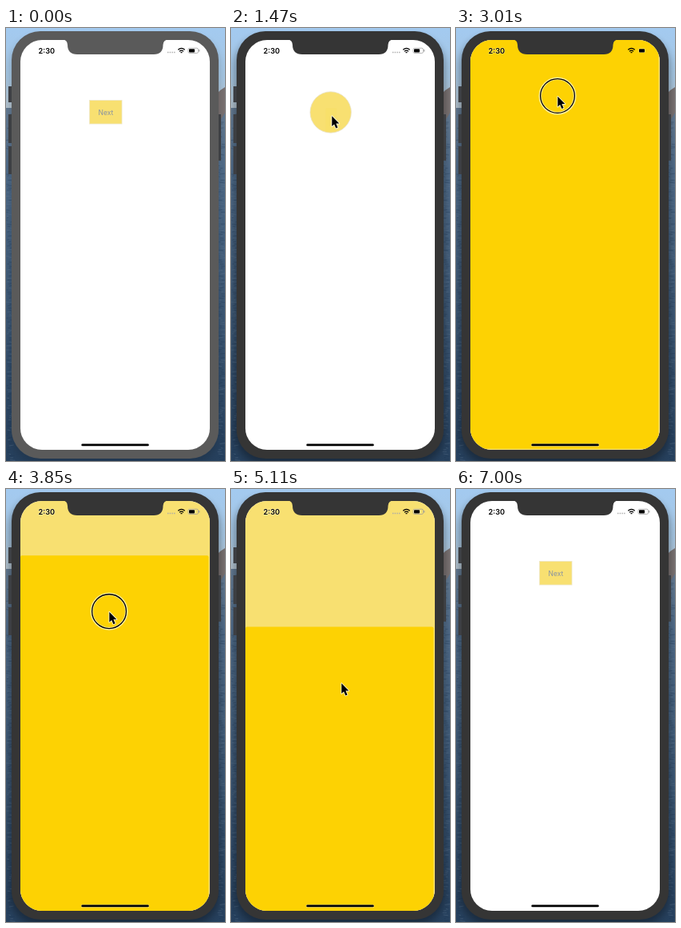
An HTML page for the animation above (7.07 s loop, 274 by 542 pixels).

```html
<!DOCTYPE html>
<html lang="en">
<head>
<meta charset="utf-8">
<title>Circular transition</title>
<style>
  html, body { margin: 0; width: 100%; height: 100%; overflow: hidden; background: #27456a; }
  svg { display: block; width: 274px; height: 542px; }
  text { font-family: Inter, Roboto, sans-serif; }
  .glow { stroke: #fff; stroke-opacity: .45; stroke-width: 1.2; paint-order: stroke; }
</style>
</head>
<body>
<svg viewBox="0 0 274 542">
  <defs>
    <linearGradient id="sky" x2="0" y2="1">
      <stop offset="0" stop-color="#a3caf0"/>
      <stop offset=".6" stop-color="#a5c6e2"/>
      <stop offset="1" stop-color="#b3c2cd"/>
    </linearGradient>
    <linearGradient id="sea" x2="0" y2="1">
      <stop offset="0" stop-color="#647b93"/>
      <stop offset=".2" stop-color="#4d6987"/>
      <stop offset=".6" stop-color="#3c5774"/>
      <stop offset="1" stop-color="#26405d"/>
    </linearGradient>
    <filter id="blur" x="-20%" y="-20%" width="140%" height="140%"><feGaussianBlur stdDeviation="5"/></filter>
    <clipPath id="screen"><rect x="18" y="15" width="237" height="513" rx="27"/></clipPath>
  </defs>

  <rect width="274" height="101" fill="url(#sky)"/>
  <rect y="100" width="274" height="442" fill="url(#sea)"/>
  <path d="M262 84L268 78L274 74V106L262 126Z" fill="#7a7272"/>
  <g id="waves" stroke-width=".8"></g>
  <rect id="shadow" x="4" y="10" width="264" height="536" rx="38" filter="url(#blur)"/>

  <path d="M3 73h5v20h-5zM3 108h5v36h-5zM3 148h5v35h-5zM264 108h5v58h-5z" fill="#3d3f43"/>
  <rect id="bezel" x="7" y="4" width="259" height="535" rx="36"/>

  <g clip-path="url(#screen)">
    <rect x="18" y="15" width="237" height="513" fill="#fff"/>
    <rect x="104.5" y="90.5" width="40.5" height="29.5" fill="#f8e071" stroke="#eee6c4" stroke-width=".8"/>
    <text x="125" y="108.8" font-size="8.5" text-anchor="middle" fill="#8793a2">Next</text>
    <circle id="bubble" cx="124.7" cy="105.5" fill="#f8e071" stroke="#e9e3cb" stroke-width=".8"/>
    <rect id="sheet" x="-118.5" y="-256.5" width="235.5" height="511.8" rx="2" fill="#fdd203"/>
  </g>
  <path id="notch" d="M70 14Q77 15 77 21Q77 33 89 33H185Q196.500 33 196.500 21Q196.500 15 204 14Z"/>

  <text class="glow" x="40.500" y="32" font-size="9.200" font-weight="600">2:30</text>
  <g id="faint" fill="none">
    <path d="M202 30.500h10" stroke="#aaa" stroke-width="1.400" stroke-dasharray="1.400 1.300"/>
    <rect x="228" y="25.200" width="12.500" height="6.300" rx="1.800" stroke="#999" stroke-width=".7"/>
    <path d="M241.800 27v2.600" stroke="#999"/>
  </g>
  <rect class="glow" x="229" y="26.200" width="7" height="4.300" rx=".8"/>
  <g fill="none" stroke="#000" stroke-width="1.300">
    <path d="M215.300 27.300Q219.500 23.500 223.700 27.300M217 29.200Q219.500 27 222 29.200"/>
    <path d="M218.500 30.600h2"/>
  </g>
  <rect class="glow" x="94.300" y="520.500" width="84.500" height="2.800" rx="1.400"/>

  <g id="pointer">
    <g id="touch" fill="none">
      <circle r="21.700" stroke="#fff" stroke-opacity=".6" stroke-width="3.600"/>
      <circle r="21.400" stroke="#000" stroke-width="1.300"/>
    </g>
    <path transform="translate(.3 .8) scale(.88)" d="M0 0V14.500L3.200 11.500L5.700 17.300L8.300 16.200L5.800 10.500H10.300Z" stroke="#fff" stroke-opacity=".8" stroke-width="2" paint-order="stroke" stroke-linejoin="round"/>
  </g>
</svg>
<script>
const LOOP = 7070;
const $ = id => document.getElementById(id);
const mix = (a, b, k) => a + (b - a) * k;
const clamp = k => Math.min(1, Math.max(0, k));
const ease = {
  in: k => k * k,
  out: k => k * (2 - k),
  both: k => k < .5 ? 2 * k * k : 1 - 2 * (1 - k) ** 2
};

// Pointer stops: time, x, y, easing on the way there
const stops = [
  [70, 152, 546, 'both'],
  [910, 126, 109.5, 'both'],
  [2100, 126, 109.5, 'both'],
  [2650, 127, 85, 'both'],
  [3000, 127, 85, 'both'],
  [3850, 129, 153, 'in'],
  [4900, 138, 242.5, 'out'],
  [6440, 138, 242.5, 'both'],
  [6980, 157, 546, 'both']
];

function pointerAt(t) {
  const last = stops[stops.length - 1];
  if (t <= stops[0][0]) return stops[0].slice(1, 3);
  if (t >= last[0]) return last.slice(1, 3);
  const i = stops.findIndex(s => s[0] >= t);
  const [t0, x0, y0] = stops[i - 1], [t1, x1, y1, kind] = stops[i];
  const k = ease[kind]((t - t0) / (t1 - t0));
  return [mix(x0, x1, k), mix(y0, y1, k)];
}

function drawWaves() {
  let seed = 7;
  const random = () => (seed = seed * 16807 % 2147483647) / 2147483647;
  const path = { '#1b3350': '', '#6f869e': '' };
  for (let y = 108; y < 542; y += 2.5) {
    for (const x of [0, 264]) {
      const color = random() < .6 ? '#1b3350' : '#6f869e';
      path[color] += `M${x + random() * 6} ${y}l${2 + random() * 5} ${random() * 2 - 1}`;
    }
  }
  $('waves').innerHTML = Object.entries(path)
    .map(([color, d]) => `<path d="${d}" stroke="${color}" opacity=".35"/>`).join('');
}

function render(t) {
  const focused = t >= 420;
  const frameColor = focused ? '#353535' : '#5a5a5a';
  $('bezel').setAttribute('fill', frameColor);
  $('notch').setAttribute('fill', frameColor);
  $('shadow').setAttribute('opacity', focused ? .32 : .14);

  const [x, y] = pointerAt(t);
  $('pointer').setAttribute('transform', `translate(${x} ${y})`);
  const pressed = t >= 1190 && t < 1330 || t >= 2950 && t < 5040;
  $('touch').setAttribute('visibility', pressed ? 'visible' : 'hidden');

  // The bubble and the sheet grow from the button and shrink back into it
  const open = t < 4000
    ? ease.both(clamp((t - 1420) / 300))
    : 1 - ease.both(clamp((t - 5123) / 300));
  const drag = t > 3000 ? clamp((y - 85) / 157.5) * 157.5 : 0;
  $('bubble').setAttribute('r', 445 * open);
  $('bubble').setAttribute('visibility', open ? 'visible' : 'hidden');
  $('sheet').setAttribute('transform',
    `translate(${mix(124.7, 136.5, open)} ${mix(105.5, 271.5 + drag, open)}) scale(${open})`);
  $('sheet').setAttribute('opacity', open);
  $('faint').setAttribute('opacity', open === 1 && drag < 12 ? 0 : 1);
}

function tick() {
  render(performance.now() % LOOP);
  requestAnimationFrame(tick);
}

drawWaves();
tick();
</script>
</body>
</html>
```
